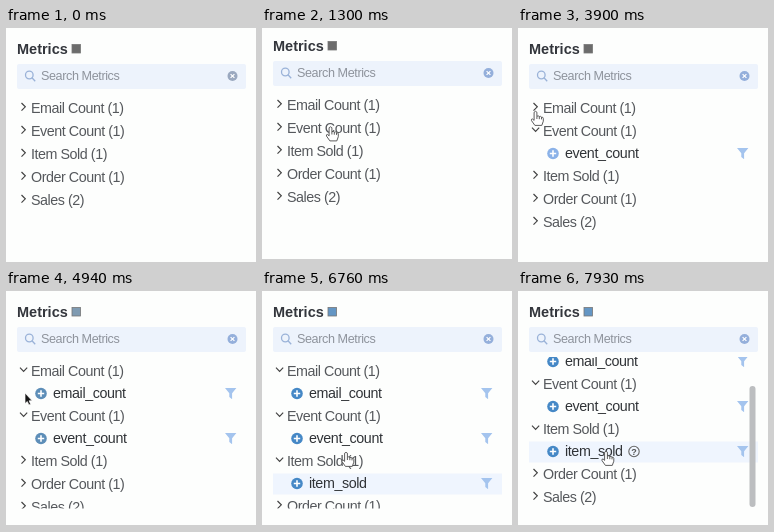
An HTML page that plays this animation: 250 by 235 pixels, repeating every 8 s.

```html
<!DOCTYPE html>
<html lang="en">
<head>
<meta charset="utf-8">
<title>Metrics</title>
<style>
  html, body { margin: 0; width: 100%; height: 100%; overflow: hidden; background: #fff; }
  svg { display: block; width: 250px; height: 235px; font-family: "Liberation Sans", Arial, sans-serif; }
  .title { font-weight: bold; font-size: 14.5px; fill: #33363c; }
  .search { font-size: 12.6px; letter-spacing: -.4px; fill: #8e939c; }
  .group { font-size: 14.3px; letter-spacing: -.45px; fill: #55585c; }
  .item { font-size: 14.3px; letter-spacing: -.4px; fill: #303337; }
  .chevron { fill: none; stroke: #444; stroke-width: 1.2; }
</style>
</head>
<body>
<svg viewBox="0 0 250 235">
  <defs>
    <clipPath id="view"><rect x="0" y="66" width="250" height="151.5"/></clipPath>
  </defs>
  <rect width="250" height="235" fill="#d0d0d0"/>
  <g id="page">
    <rect y="-5" width="250" height="239" fill="#fdfefd"/>
    <text class="title" x="11" y="26">Metrics</text>
    <rect id="badge" x="66" y="16.5" width="8.5" height="8.5" stroke="#777" stroke-width=".8"/>
    <rect x="11" y="36" width="229" height="25" rx="2" fill="#edf3fc"/>
    <g fill="none" stroke="#9ab2d8" stroke-width="1.3">
      <circle cx="23.3" cy="47" r="3.8"/>
      <path d="M26 49.8l3.2 3.4"/>
    </g>
    <text class="search" x="35" y="52.3">Search Metrics</text>
    <circle id="clear" cx="226.5" cy="48" r="5"/>
    <path d="M224.6 46.1l3.8 3.8m0-3.8l-3.8 3.8" stroke="#fff" stroke-width="1.2"/>
    <g clip-path="url(#view)"><g id="list"></g></g>
    <rect id="thumb" x="231.5" width="6" height="121" rx="3" fill="#bcbec0"/>
  </g>
  <g id="cursor" stroke-linejoin="round">
    <path id="hand" fill="#fff" stroke="#4a4a4a" stroke-width=".9"
      d="M-1.4 1.2Q0-.6 1.4 1.2V5.3Q2.8 4.2 3.8 5.6Q5.2 4.8 6 6.2Q7.6 5.8 7.8 7.4V10.2L6.3 14.4H-.6L-4 9.6Q-4.6 7.8-2.9 8L-1.4 9.4ZM1.4 5.3V8M3.8 5.6V8.2M6 6.2V8.4"/>
    <path id="arrow" fill="#151515" stroke="#fff" stroke-width=".7"
      d="M0 0V10.6L2.3 8.5L3.9 12L5.7 11.2L4.1 7.8H7.2Z"/>
  </g>
</svg>
<script>
const DURATION = 8000, STEP = 130, MAX_SCROLL = 32;
const $ = id => document.getElementById(id);

// [label, item name, time its group opens]
const groups = [
  ["Email Count (1)", "email_count", 4160],
  ["Event Count (1)", "event_count", 2730],
  ["Item Sold (1)", "item_sold", 6240],
  ["Order Count (1)"],
  ["Sales (2)"]
];

const itemMarkup = name => `
  <g class="entry">
    <rect class="hover" x="11" y="-10" width="229" height="21" fill="#eff5fe"/>
    <circle class="plus" cx="35" r="5.8"/>
    <path d="M31.8 0h6.4M35-3.2v6.4" stroke="#fff" stroke-width="1.6"/>
    <text class="item" x="47" y="4.5">${name}</text>
    <g class="help">
      <circle cx="116" r="5.2" fill="none" stroke="#666" stroke-width="1.1"/>
      <text x="116" y="3.2" font-size="9" font-weight="bold" text-anchor="middle" fill="#555">?</text>
    </g>
    <path d="M219-5.5h11.4l-4.3 5.3v6l-2.8-2.2v-3.8z" fill="#a4c4ee"/>
  </g>`;

$("list").innerHTML = groups.map(([label, name]) => `
  <g class="head">
    <path class="chevron"/>
    <text class="group" x="25" y="5">${label}</text>
  </g>${name ? itemMarkup(name) : ""}`).join("");

const heads = [...document.querySelectorAll(".head")];
const entries = [...document.querySelectorAll(".entry")];
const show = (el, on) => { el.style.display = on ? "" : "none"; };
const moveTo = (el, x, y) => el.setAttribute("transform", `translate(${x} ${y})`);

const ease = p => p * p * (3 - 2 * p);

// Keys are [time, value, ...]; returns the eased values at time t.
function track(keys, t) {
  const next = keys.findIndex(key => key[0] > t);
  if (next < 0) return keys[keys.length - 1].slice(1);
  if (next === 0) return keys[0].slice(1);
  const a = keys[next - 1], b = keys[next];
  const p = ease((t - a[0]) / (b[0] - a[0]));
  return a.slice(1).map((v, i) => v + (b[i + 1] - v) * p);
}

const cursorKeys = [
  [0, 76, 204], [780, 69, 102], [910, 69, 102], [1300, 68.5, 98.5],
  [1430, 68.5, 98.5], [2340, 17, 97], [3120, 17, 97], [3900, 17.5, 83],
  [4810, 17.5, 83], [4940, 19, 102], [5720, 17, 162], [6240, 17, 162],
  [6760, 84, 161], [6890, 84, 161], [7280, 87, 161], [7670, 87, 161], [7930, 88, 160]
];
const pageKeys = [[910, 0], [1300, -3], [1430, -3], [2340, 0]];
const scrollKeys = [[6890, 0], [7280, MAX_SCROLL]];

function layout(t, scroll) {
  let y = 80 - scroll;
  groups.forEach(([, name, opensAt], i) => {
    const open = t >= opensAt;
    moveTo(heads[i], 0, y);
    heads[i].firstElementChild.setAttribute("d",
      open ? "M14-3.3l3.6 3.6l3.6-3.6" : "M15.5-5l3.8 3.8l-3.8 3.8");
    y += open ? 22.5 : 23;
    if (!name) return;
    show(entries[i], open);
    moveTo(entries[i], 0, y);
    if (open) y += 22.5;
  });
}

function render(t) {
  const [scroll] = track(scrollKeys, t);
  const [x, y] = track(cursorKeys, t);
  moveTo($("page"), 0, track(pageKeys, t)[0]);
  layout(t, scroll);

  entries.forEach((entry, i) => {
    const hovered = i === 2 && t >= 6630;
    show(entry.querySelector(".hover"), hovered);
    show(entry.querySelector(".help"), hovered && t >= 7280);
    entry.querySelector(".plus").setAttribute("fill",
      t < 4160 ? "#8bb2e8" : t < 5850 ? "#5d8eb8" : "#4588c6");
  });
  $("badge").setAttribute("fill", t < 4160 ? "#6c6c6c" : t < 5850 ? "#7f9bb2" : "#6496c4");
  $("clear").setAttribute("fill", t < 1300 ? "#9aa8bf" : "#94afdb");

  show($("thumb"), t >= 7020);
  $("thumb").setAttribute("y", 68 + 27 * scroll / MAX_SCROLL);

  const arrow = t >= 4940 && t < 5590;
  show($("cursor"), t >= STEP);
  moveTo($("cursor"), x, y);
  show($("arrow"), arrow);
  show($("hand"), !arrow);
}

const start = performance.now();
function tick() {
  const t = (performance.now() - start) % DURATION;
  render(Math.floor(t / STEP) * STEP);
  requestAnimationFrame(tick);
}
tick();
</script>
</body>
</html>
```
